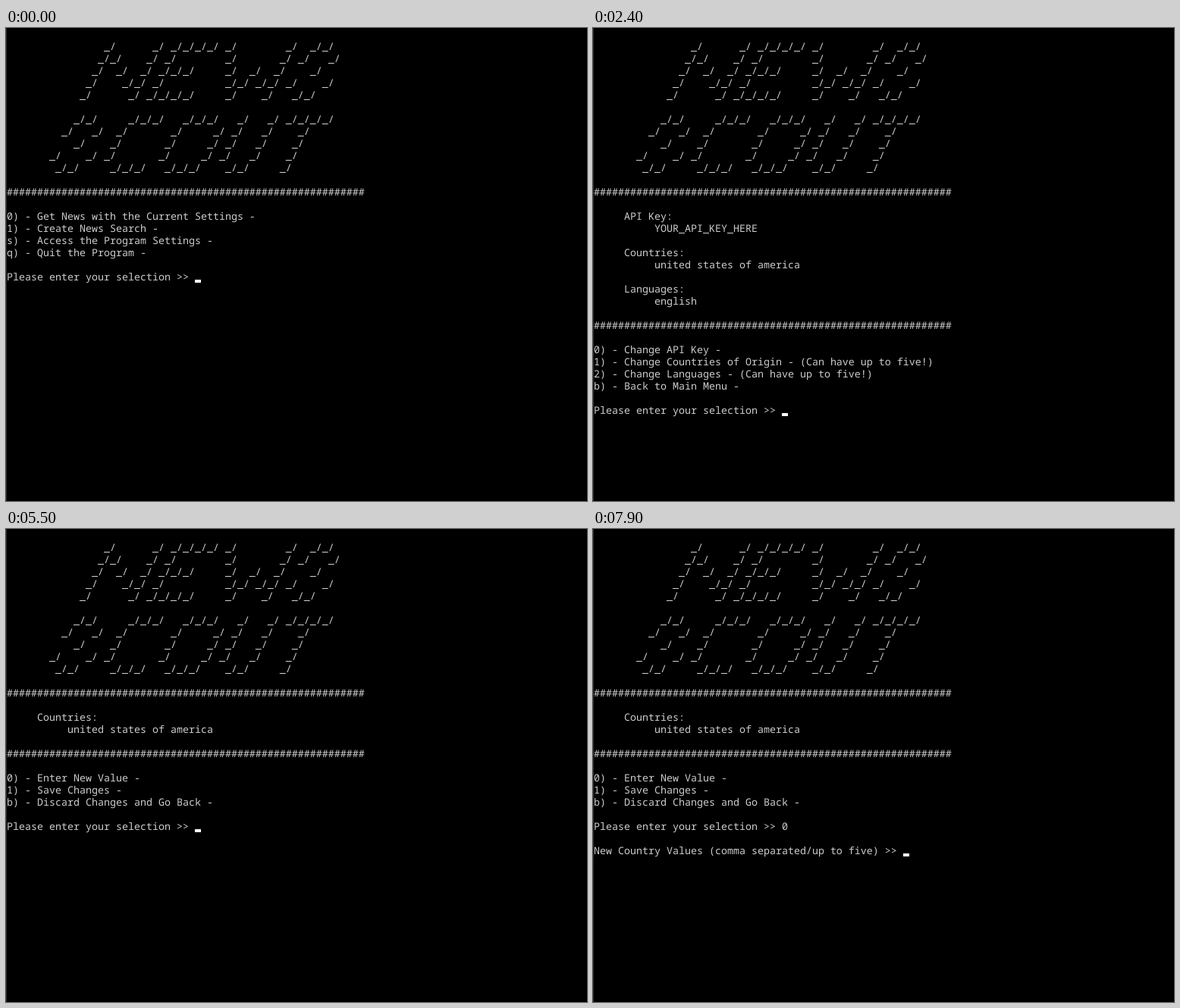
Recreate the animation shown at these times as an HTML page. Size 766 by 624 pixels, loop 8000 ms.

```html
<!DOCTYPE html>
<html lang="en">
<head>
<meta charset="utf-8">
<title>Terminal menu</title>
<style>
  html, body { margin: 0; width: 100%; height: 100%; overflow: hidden; background: #000; }
  svg { display: block; width: 766px; height: 624px; }
  text {
    font: 13.3333px "Noto Sans Mono", "Liberation Mono", monospace;
    fill: #ccc;
    white-space: pre;
    text-rendering: geometricPrecision;
  }
</style>
</head>
<body>
<svg viewBox="0 0 766 624">
  <rect width="766" height="624" fill="#000"/>
  <rect width="1" height="624" fill="#2b2b2b"/>
  <g id="lines"></g>
  <rect id="cursor" width="8" height="4" fill="#fff"/>
</svg>
<script>
const LOOP = 8000, CELL_W = 8, CELL_H = 16, LEFT = 1, BASELINE = 13, ROWS = 39;
const RULE = '#'.repeat(59);
const PROMPT = 'Please enter your selection >> ';

const BANNER = `
                _/      _/ _/_/_/_/ _/        _/  _/_/
               _/_/    _/ _/        _/       _/ _/   _/
              _/  _/  _/ _/_/_/     _/  _/  _/    _/
             _/    _/_/ _/          _/_/ _/_/ _/    _/
            _/      _/ _/_/_/_/     _/    _/   _/_/

           _/_/     _/_/_/   _/_/_/   _/   _/ _/_/_/_/
         _/   _/  _/       _/     _/ _/   _/    _/
           _/    _/       _/     _/ _/   _/    _/
       _/    _/ _/       _/     _/ _/   _/    _/
        _/_/     _/_/_/   _/_/_/    _/_/     _/

${RULE}

`;

const MAIN = BANNER + `0) - Get News with the Current Settings -
1) - Create News Search -
s) - Access the Program Settings -
q) - Quit the Program -

` + PROMPT;

const SETTINGS = BANNER + `     API Key:
          YOUR_API_KEY_HERE

     Countries:
          united states of america

     Languages:
          english

${RULE}

0) - Change API Key -
1) - Change Countries of Origin - (Can have up to five!)
2) - Change Languages - (Can have up to five!)
b) - Back to Main Menu -

` + PROMPT;

const COUNTRIES = BANNER + `     Countries:
          united states of america

${RULE}

0) - Enter New Value -
1) - Save Changes -
b) - Discard Changes and Go Back -

` + PROMPT;

// Terminal output by start time; the cursor follows the last character.
const OUTPUT = [
  [0, MAIN],
  [2100, MAIN + 's'],
  [2300, MAIN + 's\n'],
  [2400, SETTINGS],
  [4500, SETTINGS + '1'],
  [5500, COUNTRIES],
  [7000, COUNTRIES + '0'],
  [7900, COUNTRIES + '0\n\nNew Country Values (comma separated/up to five) >> ']
];

const BLINK = [
  [0, true], [500, false], [1000, true], [1400, false], [2000, true],
  [3000, false], [3400, true], [3900, false], [4400, true], [4900, false],
  [5500, true], [6400, false], [6900, true], [7400, false], [7900, true]
];

const valueAt = (track, t) => track.findLast(([start]) => start <= t)[1];

const cursor = document.getElementById('cursor');
const rows = Array.from({ length: ROWS }, (_, i) => {
  const row = document.createElementNS('http://www.w3.org/2000/svg', 'text');
  row.setAttribute('x', LEFT);
  row.setAttribute('y', i * CELL_H + BASELINE);
  return document.getElementById('lines').appendChild(row);
});

let shown;
function print(output) {
  if (output === shown) return;
  shown = output;
  const lines = output.split('\n');
  rows.forEach((row, i) => row.textContent = lines[i] || '');
  cursor.setAttribute('x', LEFT + lines.at(-1).length * CELL_W);
  cursor.setAttribute('y', lines.length * CELL_H - 4);
}

function draw(t) {
  print(valueAt(OUTPUT, t));
  cursor.setAttribute('visibility', valueAt(BLINK, t) ? 'visible' : 'hidden');
}

const start = performance.now();
function tick() {
  draw((performance.now() - start) % LOOP);
  requestAnimationFrame(tick);
}
tick();
</script>
</body>
</html>
```
